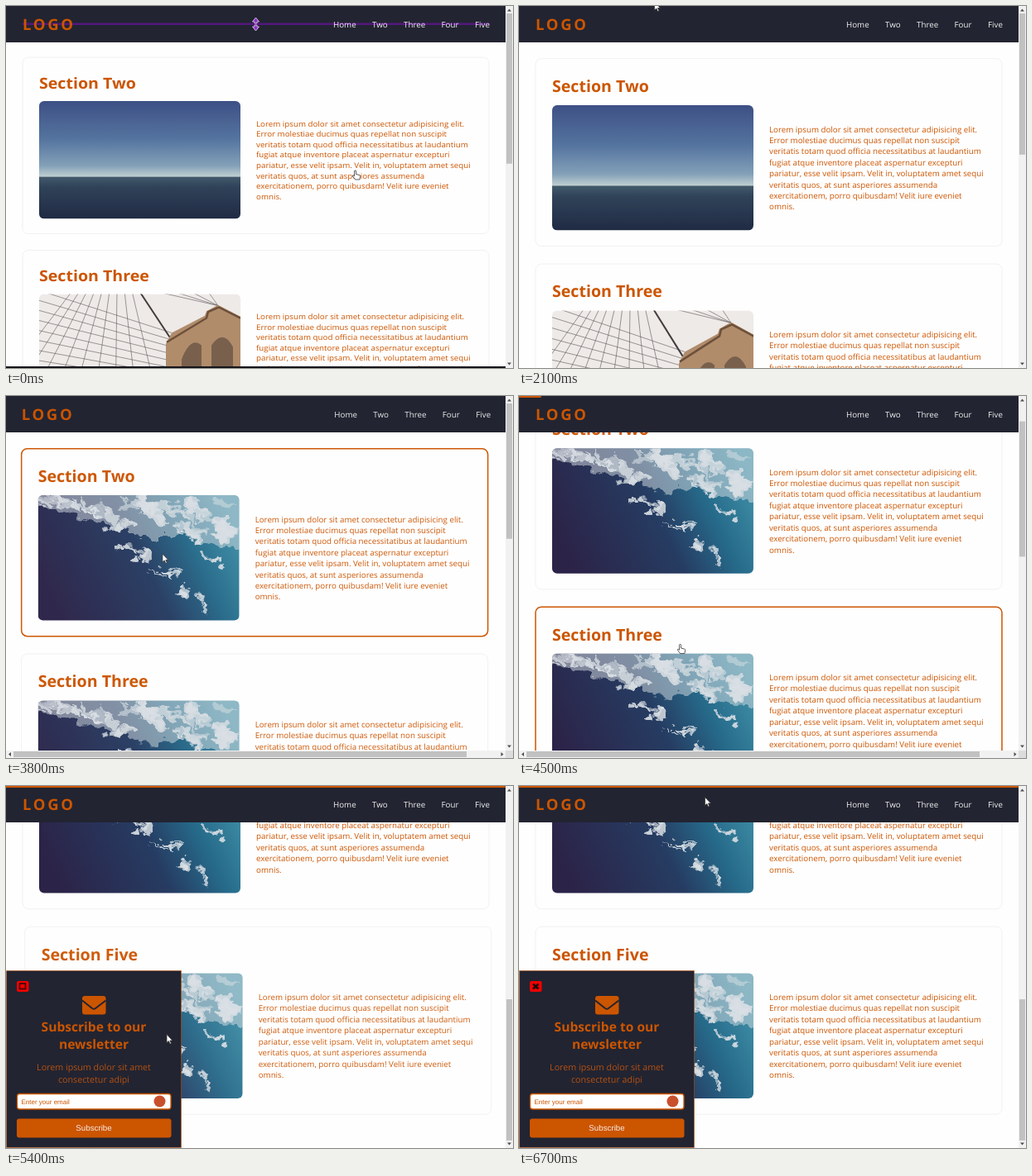
Animation, 612 px wide and 438 px high, one loop 6.8 s. Source, as an HTML page:

```html
<!DOCTYPE html>
<html lang="en">
<head>
<meta charset="utf-8">
<title>Landing page scroll</title>
<style>
html, body { margin: 0; width: 100%; height: 100%; overflow: hidden; background: #fefefe; }
svg { display: block; }
text { font: 9.75px "Open Sans", sans-serif; fill: #cc5500; text-rendering: geometricPrecision; }
.h2 { font-size: 19.6px; font-weight: 700; }
.logo { font-size: 18.5px; font-weight: 700; letter-spacing: 2.7px; }
.link { fill: #f0f0f0; }
.mid { text-anchor: middle; }
.title { font-size: 15.6px; font-weight: 700; }
.lead { font-size: 10.7px; fill: #b65010; }
.form { font-family: "Liberation Sans", Arial, sans-serif; }
</style>
</head>
<body>
<svg id="stage" width="612" height="438" viewBox="0 0 612 438">
  <defs>
    <clipPath id="frame"><rect width="243" height="151.5" rx="6"/></clipPath>
    <filter id="ragged" color-interpolation-filters="sRGB">
      <feTurbulence type="fractalNoise" baseFrequency=".06 .08" numOctaves="3" seed="4"/>
      <feDisplacementMap in="SourceGraphic" scale="26" xChannelSelector="R" yChannelSelector="G"/>
      <feGaussianBlur stdDeviation=".7"/>
    </filter>
    <linearGradient id="sky" x2="0" y2="1">
      <stop offset="0" stop-color="#3d5085"/><stop offset=".5" stop-color="#55749f"/>
      <stop offset=".85" stop-color="#83a0b8"/><stop offset="1" stop-color="#c3d2d2"/>
    </linearGradient>
    <linearGradient id="sea" x2="0" y2="1">
      <stop offset="0" stop-color="#435a6c"/><stop offset=".25" stop-color="#2f4258"/>
      <stop offset="1" stop-color="#202b44"/>
    </linearGradient>
    <linearGradient id="deep" x1="0" y1=".6" x2="1" y2=".3">
      <stop offset="0" stop-color="#2c2348"/><stop offset=".5" stop-color="#263c62"/>
      <stop offset=".75" stop-color="#266a8a"/><stop offset="1" stop-color="#3f8ea6"/>
    </linearGradient>
    <g id="horizon" clip-path="url(#frame)">
      <rect width="243" height="98" fill="url(#sky)"/>
      <rect y="97.5" width="243" height="54" fill="url(#sea)"/>
    </g>
    <g id="bridge" clip-path="url(#frame)">
      <rect width="243" height="152" fill="#eeeae8"/>
      <g id="cables" stroke="#5b5254" stroke-width=".6"/>
      <path d="M122 -2L158 56" stroke="#443c3e" stroke-width="2"/>
      <path d="M153 152V64l3-6 4-8 40-22 2-6 14-8 27 15V152z" fill="#b08c6b"/>
      <path d="M154 62l48-31 2-8 13-6 26 14" fill="none" stroke="#6d503a" stroke-width="2.500"/>
      <path d="M172 152V84q11-30 24-18V152zM208 152V66q14-22 26 2V152z" fill="#79604c"/>
    </g>
    <g id="water" clip-path="url(#frame)">
      <rect width="243" height="152" fill="url(#deep)"/>
      <g id="foam" fill="#d9dfe4" filter="url(#ragged)">
        <path d="M-20 -20H263V62Q215 66 180 50L122 50L92 38L60 30L24 16L-20 16z" opacity=".5"/>
      </g>
    </g>
  </defs>
</svg>
<script>
const LOOP = 6800, RELOAD = 2900, IMAGES = 3500, REVEAL = 3068, REVEAL_LAST = 4802, POPUP = 4710;
const ORANGE = '#cc5500', DARK = '#222431';
const LINES = [
  'Lorem ipsum dolor sit amet consectetur adipisicing elit.',
  'Error molestiae ducimus quas repellat non suscipit',
  'veritatis totam quod officia necessitatibus at laudantium',
  'fugiat atque inventore placeat aspernatur excepturi',
  'pariatur, esse velit ipsam. Velit in, voluptatem amet sequi',
  'veritatis quos, at sunt asperiores assumenda',
  'exercitationem, porro quibusdam! Velit iure eveniet',
  'omnis.'
];
const stage = document.getElementById('stage');
const byId = id => document.getElementById(id);
const clamp = v => Math.max(0, Math.min(1, v));
const inOut = u => u < .5 ? 2 * u * u : 1 - 2 * (1 - u) ** 2;
const outCubic = u => 1 - (1 - u) ** 3;
const mix = (a, b, u) => a + (b - a) * u;

function set(node, attrs) {
  for (const k in attrs) node.setAttribute(k, attrs[k]);
}
function add(parent, tag, attrs = {}, content) {
  const node = document.createElementNS('http://www.w3.org/2000/svg', tag);
  set(node, attrs);
  if (content) node.textContent = content;
  parent.append(node);
  return node;
}
const group = parent => add(parent, 'g');
const label = (parent, x, y, cls, content) => add(parent, 'text', { x, y, class: cls }, content);
const box = (parent, x, y, width, height, fill, more) =>
  add(parent, 'rect', { x, y, width, height, fill, ...more });
const show = (node, on) => set(node, { visibility: on ? 'inherit' : 'hidden' });
const move = (node, x, y) => set(node, { transform: `translate(${x} ${y})` });

// Picture details
let seed = 7;
const random = () => (seed = seed * 16807 % 2147483647) / 2147483647;
for (let i = 0; i < 9; i++) {
  add(byId('cables'), 'path', { d: `M-4 ${i * 13 - 6}L160 ${50 + i * 9}` });
  add(byId('cables'), 'path', { d: `M${40 + i * 9} -4L${-70 + i * 27} 150` });
  if (i < 4) add(byId('cables'), 'path', { d: `M216 15L${130 + i * 24} -6` });
}
for (const [x, y, rx, ry] of [
  [14, 7, 18, 6], [48, 14, 22, 8], [76, 22, 20, 9], [104, 34, 18, 10], [122, 10, 30, 10],
  [160, 22, 32, 14], [200, 18, 34, 16], [226, 42, 22, 14], [182, 46, 24, 8], [96, 66, 9, 9],
  [124, 72, 16, 6], [156, 92, 16, 5], [176, 112, 7, 14], [208, 78, 18, 6], [200, 130, 8, 12]
]) for (let i = 0; i < 6; i++) {
  const cx = x + (random() - .5) * rx * 1.4, cy = y + (random() - .5) * ry * 1.4;
  add(byId('foam'), 'ellipse', {
    cx, cy, rx: rx * (.25 + random() * .35), ry: ry * (.2 + random() * .35),
    opacity: .5 + random() * .4, transform: `rotate(${15 + random() * 40} ${cx} ${cy})`
  });
}

// Page
const page = group(stage);
const sections = ['Two', 'Three', 'Four', 'Five'].map((name, i) => {
  const root = group(page);
  const border = add(root, 'rect', { x: 20, y: 63.7, width: 563, rx: 7, fill: 'none' });
  label(root, 40, 104, 'h2', 'Section ' + name);
  const full = group(root), plain = group(root);
  const picture = add(full, 'use', { x: 40, y: 120 });
  LINES.forEach((line, n) => label(full, 302, 152.5 + n * 13.42, '', line));
  for (let n = 0; n < 4; n++)
    label(plain, 60, 130.5 + n * 13.42, '', LINES[2 * n] + ' ' + LINES[2 * n + 1]);
  return { root, border, full, plain, picture, side: i < 2 ? -1 : 1 };
});

// Popup
const popup = group(stage);
box(popup, .5, 223.5, 211, 214, DARK, { stroke: ORANGE, 'stroke-dasharray': '1 1' });
box(popup, 13, 236, 14.5, 13, '#f00000', { rx: 2 });
const closeBox = box(popup, 16.5, 239, 7, 6.5, 'none', { stroke: '#3a0508', 'stroke-width': 1.6 });
const closeMark = add(popup, 'path', { d: 'M17 239.5l6.5 6m0-6l-6.5 6', stroke: '#20060a', 'stroke-width': 2.4 });
box(popup, 92, 254, 28.5, 22.5, ORANGE, { rx: 3 });
add(popup, 'path', { d: 'M92 259.5l12 9.5q2 1.5 4 0l12.5-9.5', fill: 'none', stroke: DARK, 'stroke-width': 2 });
label(popup, 106, 296.5, 'mid title', 'Subscribe to our');
label(popup, 106, 318, 'mid title', 'newsletter');
label(popup, 106, 344, 'mid lead', 'Lorem ipsum dolor sit amet');
label(popup, 106, 358.5, 'mid lead', 'consectetur adipi');
box(popup, 13.5, 372.5, 185.5, 18.5, '#fff', { rx: 3, stroke: ORANGE, 'stroke-width': 1.3 });
label(popup, 18.5, 384.5, 'form', 'Enter your email').style.fontSize = '8px';
add(popup, 'circle', { cx: 185.5, cy: 381.5, r: 7, fill: '#c9502c' });
box(popup, 13, 402.5, 186.5, 23, ORANGE, { rx: 3 });
label(popup, 106, 417, 'mid form', 'Subscribe').style.fill = '#f6ece6';

// Navigation
box(stage, 0, 0, 603, 44, DARK);
const resizeLine = box(stage, 20, 20.5, 564, 2.5, '#5c168c', { opacity: .85 });
const logo = label(stage, 20, 29, 'logo', 'LOGO');
const links = group(stage);
[['Home', 395], ['Two', 442], ['Three', 480], ['Four', 525.5], ['Five', 566]]
  .forEach(([name, x]) => label(links, x, 25.5, 'link', name));
const progress = box(stage, 0, 0, 0, 2, ORANGE);

// Window resize marker
const resize = group(stage);
add(resize, 'path', {
  d: 'M301.5 14l4 5h-2.5v2h-3v-2h-2.5zM301.5 30l4-5h-2.5v-2h-3v2h-2.5z',
  fill: '#8a35c0', stroke: '#e6d2f2', 'stroke-width': .8
});
box(resize, 0, 436, 612, 2, '#15151a');

// Scrollbars
const arrow = (parent, d) => add(parent, 'path', { d, fill: '#505050' });
box(stage, 603, 0, 9, 438, '#f1f1f1');
const thumb = box(stage, 604, 9, 7, 0, '#c1c1c1');
arrow(stage, 'M605 6.5h5l-2.5-3z');
const downArrow = arrow(stage, 'M605 431.5h5l-2.5 3z');
const hbar = group(stage);
box(hbar, 0, 429, 603, 9, '#f1f1f1');
box(hbar, 603, 429, 9, 9, '#dcdcdc');
box(hbar, 9, 430, 547, 7, '#c1c1c1');
arrow(hbar, 'M6 431v5l-3-2.5z');
arrow(hbar, 'M597.5 431v5l3-2.5z');

// Pointers, each drawn from its tip
const pointer = d => add(stage, 'path', { d, fill: '#fff', stroke: '#333', 'stroke-width': .8, 'stroke-linejoin': 'round' });
const arrowCursor = pointer('M0 0v10l2.3-2 1.7 3.6 1.5-.7-1.6-3.4h3.1z');
const handCursor = pointer('M0 0q1.5-.6 1.5 1v3.5l4 1q1.3.4 1.2 1.5l-.8 4h-5.4l-3-4q-.4-1.5 1-1l1 .8v-5.8q0-.8.5-1z');

const scrollAt = t => 638.7 * inOut(clamp((t - 4400) / 474));
const slideAt = (t, start) => t < start ? 60 : 60 * Math.exp(-.0052 * (t - start));

function cursorAt(t) {
  if (t < 2200) {
    const u = inOut(clamp((t - 500) / 900));
    return [mix(421, 163.5, u), mix(199, -5, u)];
  }
  if (t < 3700) return null;
  if (t < 5600) {
    const u = outCubic(clamp((t - 3600) / 700));
    return [mix(180, 194, u), mix(0, 300.5, u)];
  }
  const u = inOut(clamp((t - 5600) / 1100));
  return [mix(194, 224.5, u), mix(300.5, 13.5, u)];
}

function draw(t) {
  const fresh = t >= RELOAD, images = !fresh || t >= IMAGES;
  const scroll = fresh ? scrollAt(t) : 0;
  const pitch = images ? 248.4 : 150, height = images ? 227 : 129.5;
  const squash = 1 - inOut(clamp(t / 500));
  const slides = sections.map((s, i) => fresh ? slideAt(t, i < 3 ? REVEAL : REVEAL_LAST) : 0);
  const wide = slides[3] > 20;
  const cursor = cursorAt(t);

  set(page, { transform: `translate(0 ${2.2 * squash - scroll}) scale(1 ${1 - .06 * squash})` });
  sections.forEach((s, i) => {
    const top = 64 + i * pitch - scroll;
    const hover = fresh && t < 5000 && cursor && cursor[1] > Math.max(top, 43) && cursor[1] < top + height;
    move(s.root, s.side * slides[i], i * pitch);
    set(s.root, { opacity: 1 - slides[i] / 60 });
    set(s.border, { height, stroke: hover ? ORANGE : '#f1f1f1', 'stroke-width': hover ? 1.5 : 1 });
    set(s.picture, { href: fresh ? '#water' : i % 2 ? '#bridge' : '#horizon' });
    show(s.full, images);
    show(s.plain, !images);
  });

  const navSlide = fresh ? slideAt(t, REVEAL) : 0;
  move(logo, -navSlide, 0);
  move(links, navSlide, 0);
  set(logo, { opacity: 1 - navSlide / 60 });
  set(links, { opacity: 1 - navSlide / 60 });

  const view = wide ? 429 : 438 + 28 * squash, track = wide ? 411 : 420;
  const content = images ? 1077 : 683, size = track * view / content;
  set(thumb, { y: 9 + (track - size) * scroll / (content - view), height: size });
  set(progress, { width: fresh ? 603 * clamp(scrollAt(t - 29) / (content - view)) : 0 });
  move(downArrow, 0, wide ? -9 : 0);
  show(hbar, wide);
  show(resize, t < 200);
  show(resizeLine, t < 200);

  move(popup, -212 * (1 - outCubic(clamp((t - POPUP) / 400))), wide ? -9.5 : 0);
  show(popup, t > POPUP);
  show(closeBox, t < 5700);
  show(closeMark, t >= 5700);

  // Children of the popup inherit its state, so hide them with it
  if (t <= POPUP) [closeBox, closeMark].forEach(node => show(node, false));

  const hand = t < 700 || (t >= 4200 && t < 5000);
  show(handCursor, cursor && hand);
  show(arrowCursor, cursor && !hand);
  if (cursor) move(hand ? handCursor : arrowCursor, ...cursor);
}

const start = performance.now();
function tick() {
  const t = (performance.now() - start) % LOOP;
  draw(Math.floor(t / 100) * 100);
  requestAnimationFrame(tick);
}
tick();
</script>
</body>
</html>
```
